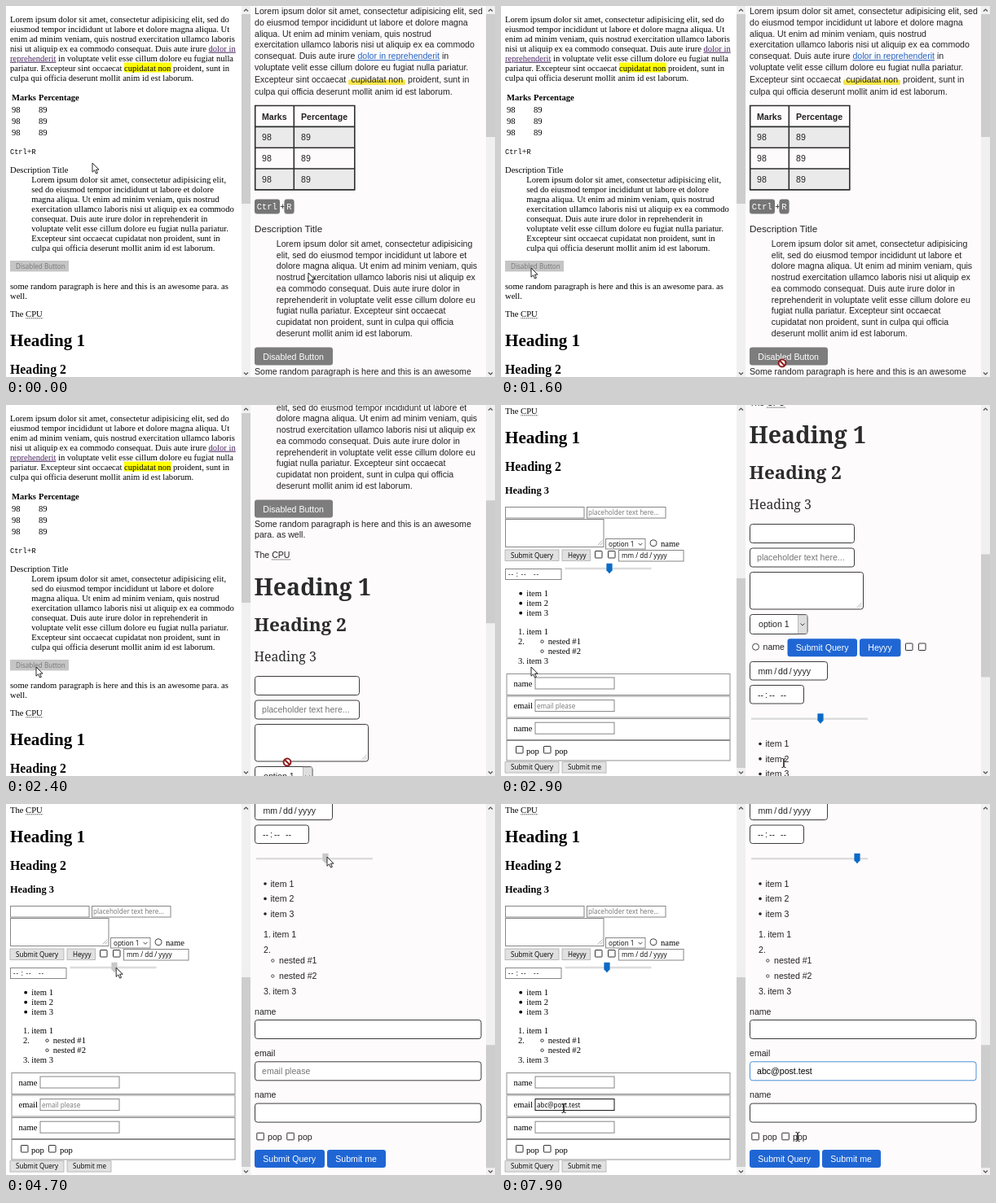
An HTML page that plays this animation: 600 px wide and 456 px high, repeating every 8000 ms.

```html
<!DOCTYPE html>
<html lang="en">
<head>
<meta charset="utf-8">
<title>Plain and styled form elements</title>
<style>
html, body { margin: 0; width: 100%; height: 100%; overflow: hidden; background: #fff; }
svg { display: block; width: 100vw; height: 100vh; }
text { white-space: pre; }
.serif { font-family: "Liberation Serif", Times, serif; font-size: 10.58px; }
.sans { font-family: "Liberation Sans", Arial, sans-serif; font-size: 10.58px; fill: #222; }
.ui { font-family: "Open Sans", "Noto Sans", sans-serif; font-size: 8.1px; }
.mono { font-family: "Liberation Mono", "Courier New", monospace; }
.head { font-family: "Noto Serif", serif; fill: #2b2b2b; }
.bold { font-weight: bold; }
.hint { fill: #757575; }
.white { fill: #fff; }
</style>
</head>
<body>
<svg id="stage" viewBox="0 0 600 456" xmlns="http://www.w3.org/2000/svg"></svg>
<script>
const LOOP = 8000;
const EMAIL = 'abc@post.test';
const LEFT_LOWER = 371, RIGHT_MIDDLE = 490, RIGHT_LOWER = 808.5;

const rect = (x, y, x2, y2, attrs = '') =>
  `<rect x="${x}" y="${y}" width="${x2 - x}" height="${y2 - y}" ${attrs}/>`;
const text = (x, y, content, cls, attrs = '') =>
  `<text x="${x}" y="${y}" class="${cls}" ${attrs}>${content}</text>`;
const lines = (x, y, step, cls, rows) =>
  rows.map((row, i) => text(x, y + step * i, row, cls)).join('');
const group = (dy, content) => `<g transform="translate(0 ${dy})">${content}</g>`;
const dot = (x, y, r, attrs = '') => `<circle cx="${x}" cy="${y}" r="${r}" ${attrs}/>`;
const path = (d, attrs) => `<path d="${d}" ${attrs}/>`;
const checkbox = (x, y) => rect(x, y, x + 8.5, y + 8.5, 'fill="#fff" stroke="#333" rx=".6"');
const radio = (x, y) => dot(x, y, 4, 'fill="#fff" stroke="#444"');
const grip = (x, y) => path(`M${x - 6} ${y}l6-6M${x - 3} ${y}l3-3`, 'stroke="#999" stroke-width=".7"');
const chevron = (x, y) => path(`M${x - 2.5} ${y - 1.2}l2.5 2.5 2.5-2.5`, 'fill="none" stroke="#444"');
const link = (s, color) => `<tspan fill="${color}" text-decoration="underline">${s}</tspan>`;
const abbr = (x, y, width) =>
  path(`M${x} ${y}h${width}`, 'stroke="#333" stroke-width=".9" stroke-dasharray="1 .7"');
const thumb = id => path('M-3.6-6.2h7.2v8.4l-3.6 4-3.6-4z', `id="${id}"`);

const plainInput = (x, y, x2, y2, attrs = '') =>
  rect(x + .5, y + .5, x2, y2, `fill="#fff" stroke="#858585" ${attrs}`);
const plainButton = (x, y, x2, label, disabled) =>
  rect(x, y, x2, y + 13.4, disabled ? 'fill="#c5c5c5"' : 'fill="#e1e1e1" stroke="#adadad" stroke-width=".8"') +
  text(x + 7, y + 9.7, label, 'ui', disabled ? 'fill="#757575"' : '');
const niceInput = (x, y, x2, y2, attrs = '') =>
  rect(x + .5, y + .5, x2 - .5, y2 - .5, `rx="3" fill="#fff" stroke="#3c3c3c" ${attrs}`);
const niceButton = (x, y, x2, label, fill = '#1f66d4') =>
  rect(x, y, x2, y + 22, `rx="3.2" fill="${fill}"`) + text(x + 10.3, y + 15, label, 'sans white');

function leftPage() {
  const visited = '#4c2a63';
  const upper =
    rect(145, 69.5, 203, 81.5, 'fill="#ff0"') +
    lines(5, 19.7, 12, 'serif', [
      'Lorem ipsum dolor sit amet, consectetur adipisicing elit, sed do',
      'eiusmod tempor incididunt ut labore et dolore magna aliqua. Ut',
      'enim ad minim veniam, quis nostrud exercitation ullamco laboris',
      'nisi ut aliquip ex ea commodo consequat. Duis aute irure ' + link('dolor in', visited),
      link('reprehenderit', visited) + ' in voluptate velit esse cillum dolore eu fugiat nulla',
      'pariatur. Excepteur sint occaecat cupidatat non proident, sunt in',
      'culpa qui officia deserunt mollit anim id est laborum.']) +
    text(7, 115.6, 'Marks', 'serif bold') + text(40, 115.6, 'Percentage', 'serif bold') +
    lines(7, 130.6, 14.4, 'serif', ['98', '98', '98']) +
    lines(40, 130.6, 14.4, 'serif', ['89', '89', '89']) +
    text(5, 182, '<tspan class="mono" font-size="8.6">Ctrl</tspan>+<tspan class="mono" font-size="8.6">R</tspan>', 'serif') +
    text(5, 204.6, 'Description Title', 'serif') +
    lines(31.2, 216.6, 12, 'serif', [
      'Lorem ipsum dolor sit amet, consectetur adipisicing elit,',
      'sed do eiusmod tempor incididunt ut labore et dolore',
      'magna aliqua. Ut enim ad minim veniam, quis nostrud',
      'exercitation ullamco laboris nisi ut aliquip ex ea commodo',
      'consequat. Duis aute irure dolor in reprehenderit in',
      'voluptate velit esse cillum dolore eu fugiat nulla pariatur.',
      'Excepteur sint occaecat cupidatat non proident, sunt in',
      'culpa qui officia deserunt mollit anim id est laborum.']) +
    plainButton(5, 313, 77, 'Disabled Button', true) +
    lines(5, 347.6, 12, 'serif', ['some random paragraph is here and this is an awesome para. as', 'well.']);

  const fieldsets = [330.5, 358, 385.5, 412.5].map((y, i) =>
    rect(7, y, 281, y + (i < 3 ? 26 : 24.5), 'fill="none" stroke="#8f8f8f"')).join('');
  const lower =
    text(5, 10.7, 'The CPU', 'serif') + abbr(24.3, 12.8, 21) +
    text(5, 46.8, 'Heading 1', 'serif bold', 'style="font-size:21.1px"') +
    text(5, 80.7, 'Heading 2', 'serif bold', 'style="font-size:15.8px"') +
    text(5, 109, 'Heading 3', 'serif bold', 'style="font-size:12.35px"') +
    plainInput(5, 125, 102, 139) + plainInput(105, 125, 202, 139) +
    text(107, 135.2, 'placeholder text here...', 'ui hint') +
    plainInput(5, 140, 126, 174.5) + grip(124.5, 172.5) +
    plainInput(128, 164, 177, 177) + text(132, 173.7, 'option 1', 'ui') + chevron(171, 171) +
    radio(187, 169.7) + text(196, 174, 'name', 'serif') +
    plainButton(5, 178, 71, 'Submit Query') + plainButton(75, 178, 109.5, 'Heyyy') +
    checkbox(115.5, 179.5) + checkbox(131.5, 179.5) +
    plainInput(144, 178, 224, 192) + text(148, 188, 'mm / dd / yyyy', 'ui') +
    plainInput(5, 201, 74, 214.5) + text(9, 210.7, '-- : --   --', 'ui', 'letter-spacing=".8"') +
    rect(78.5, 199.7, 184.5, 202.3, 'fill="#dcdcdc"') + thumb('leftThumb') +
    [231, 243, 255].map((y, i) =>
      dot(24.2, y + .7, 1.9) + text(31.2, y + 4, 'item ' + (i + 1), 'serif')).join('') +
    text(21, 281.7, '1.', 'serif') + text(31.2, 281.7, 'item 1', 'serif') +
    text(21, 293.7, '2.', 'serif') + text(21, 317.7, '3.', 'serif') +
    text(31.2, 317.7, 'item 3', 'serif') +
    [290, 302].map((y, i) => dot(50.5, y + .7, 1.7, 'fill="none" stroke="#000" stroke-width=".8"') +
      text(57.7, y + 3.7, 'nested #' + (i + 1), 'serif')).join('') +
    fieldsets +
    ['name', 'email', 'name'].map((label, i) => text(15.5, 345.8 + 27.6 * i, label, 'serif') +
      plainInput(41.5, 334.5 + 27.6 * i, 139, 349 + 27.6 * i, i === 1 ? 'id="leftField"' : '')).join('') +
    text(44, 372.8, '', 'ui', 'id="leftEmail"') +
    checkbox(18.5, 419.5) + text(31, 428.8, 'pop', 'serif') +
    checkbox(52.5, 419.5) + text(66, 428.8, 'pop', 'serif') +
    plainButton(5, 438.7, 71, 'Submit Query') + plainButton(75, 438.7, 129, 'Submit me');
  return upper + group(LEFT_LOWER, lower);
}

function niceTable() {
  const edge = i => 122.5 + 25.85 * i;
  const rows = [1, 2, 3].map(i =>
    (i % 2 ? rect(305, edge(i), 428, edge(i + 1), 'fill="#eaeaea"') : '') +
    text(314, edge(i) + 16.9, '98', 'sans') + text(362, edge(i) + 16.9, '89', 'sans')).join('');
  const rules = [0, 1, 2, 3, 4].map(i => `M305 ${edge(i)}H428.5`).join('');
  return rows + text(314, 139.8, 'Marks', 'sans bold') + text(362, 139.8, 'Percentage', 'sans bold') +
    path(rules + 'M305.7 122V226M353.3 122V226M427.8 122V226', 'stroke="#2e2e2e" stroke-width="1.6"');
}

function rightPage() {
  const key = (x, x2, label) => rect(x, 239, x2, 256, 'rx="3" fill="#bbb"') +
    rect(x, 237.5, x2, 255, 'rx="3" fill="#757575"') +
    text(x + 2.8, 249.7, label, 'mono white', 'font-size="10.4"');
  const upper =
    rect(420, 90.5, 490, 97, 'rx="1.5" fill="#f7e54a"') +
    lines(305, 10, 13.8, 'sans', [
      'Lorem ipsum dolor sit amet, consectetur adipisicing elit, sed',
      'do eiusmod tempor incididunt ut labore et dolore magna',
      'aliqua. Ut enim ad minim veniam, quis nostrud',
      'exercitation ullamco laboris nisi ut aliquip ex ea commodo',
      'consequat. Duis aute irure ' + link('dolor in reprehenderit', '#2563c4') + ' in',
      'voluptate velit esse cillum dolore eu fugiat nulla pariatur.']) +
    text(305, 94, 'Excepteur sint occaecat', 'sans') + text(423.5, 94, 'cupidatat non', 'sans') +
    text(493, 94, 'proident, sunt in', 'sans') +
    text(305, 108.8, 'culpa qui officia deserunt mollit anim id est laborum.', 'sans') +
    niceTable() +
    key(305, 336, 'Ctrl') + text(336.2, 249.6, '+', 'sans') + key(341.5, 353.5, 'R') +
    text(305, 278, 'Description Title', 'sans', 'style="font-size:11.7px"') +
    lines(331.8, 296, 13.72, 'sans', [
      'Lorem ipsum dolor sit amet, consectetur adipisicing',
      'elit, sed do eiusmod tempor incididunt ut labore et',
      'dolore magna aliqua. Ut enim ad minim veniam, quis',
      'nostrud exercitation ullamco laboris nisi ut aliquip ex',
      'ea commodo consequat. Duis aute irure dolor in',
      'reprehenderit in voluptate velit esse cillum dolore eu',
      'fugiat nulla pariatur. Excepteur sint occaecat',
      'cupidatat non proident, sunt in culpa qui officia',
      'deserunt mollit anim id est laborum.']) +
    niceButton(305, 419.5, 401, 'Disabled Button', '#7d7d7d') +
    lines(305, 452.6, 13.8, 'sans', ['Some random paragraph is here and this is an awesome', 'para. as well.']) +
    text(305, 490.8, 'The CPU', 'sans') + abbr(326, 493, 23);

  const middle =
    text(304.5, 47, 'Heading 1', 'head bold', 'font-size="28.5"') +
    text(304.5, 91, 'Heading 2', 'head bold', 'font-size="22.5"') +
    text(304.5, 128, 'Heading 3', 'head', 'font-size="15.8"') +
    niceInput(305, 146, 434, 170) + niceInput(305, 175.5, 434, 199.5) +
    text(314, 191, 'placeholder text here...', 'sans hint') +
    niceInput(305, 205, 445, 251.5) + grip(442.5, 249) +
    niceInput(305, 257, 376.5, 282) + rect(364.5, 258, 375.5, 281, 'fill="#dedede" stroke="#999" stroke-width=".6"') +
    chevron(370, 269.7) + text(316, 273, 'option 1', 'sans') +
    radio(312.5, 297.3) + text(321.5, 301.3, 'name', 'sans') +
    niceButton(351.5, 287.3, 437, 'Submit Query') + niceButton(440, 287.3, 490.5, 'Heyyy') +
    checkbox(496.5, 293) + checkbox(512.5, 293) +
    niceInput(305, 315, 401, 338.5) +
    text(315.5, 330.7, 'mm<tspan dx="2">/</tspan><tspan dx="2">dd</tspan><tspan dx="2">/</tspan><tspan dx="2">yyyy</tspan>', 'sans') +
    niceInput(305, 344, 372, 367.5) +
    text(315, 359.7, '--<tspan dx="2">:</tspan><tspan dx="2">--</tspan><tspan dx="7">--</tspan>', 'sans');

  const lower =
    rect(307, 66, 450, 68.4, 'fill="#dcdcdc"') + thumb('rightThumb') +
    [98, 116.4, 135].map((y, i) =>
      dot(318, y, 1.8, 'fill="#222"') + text(324.5, y + 3.8, 'item ' + (i + 1), 'sans')).join('') +
    [160, 179, 230].map((y, i) =>
      text(316, y + 3.8, i + 1 + '.', 'sans') + (i === 1 ? '' : text(327.3, y + 3.8, 'item ' + (i + 1), 'sans'))).join('') +
    [192, 211].map((y, i) => dot(327.3, y + .5, 1.7, 'fill="none" stroke="#222" stroke-width=".8"') +
      text(335, y + 3.8, 'nested #' + (i + 1), 'sans')).join('') +
    ['name', 'email', 'name'].map((label, i) => text(305, 258.8 + 51.3 * i, label, 'sans') +
      niceInput(305, 265 + 51.3 * i, 583.5, 289 + 51.3 * i, i === 1 ? 'id="rightField"' : '')).join('') +
    text(314, 332.2, '', 'sans', 'id="rightEmail"') +
    checkbox(307.8, 404.3) + text(321, 412.6, 'pop', 'sans') +
    checkbox(344.8, 404.3) + text(358, 412.6, 'pop', 'sans') +
    `<g id="hoverButton">${niceButton(305, 425, 391, 'Submit Query')}</g>` +
    niceButton(394, 425, 466, 'Submit me');
  return upper + group(RIGHT_MIDDLE, middle) + group(RIGHT_LOWER, lower);
}

const scrollbar = (x, id, height) =>
  rect(x, 0, x + 11, 456, 'fill="#f0f0f0"') +
  rect(x, 0, x + 11, height, `id="${id}" fill="#cdcdcd"`) +
  path(`M${x + 3} 6.5l2.5-2.5 2.5 2.5M${x + 3} 450.5l2.5 2.5 2.5-2.5`, 'fill="none" stroke="#505050" stroke-width="1.2"');

const POINTERS = {
  arrow: path('M0 0V11.2l2.6-2.4 1.9 4.2 1.9-.8-1.9-4.1h3.5z', 'fill="#fff" stroke="#111" stroke-width=".9"'),
  blocked: dot(0, 0, 4.4, 'fill="#fff" stroke="#8e1b1b" stroke-width="2"') +
    path('M-3-3l6 6', 'stroke="#8e1b1b" stroke-width="2"'),
  beam: path('M-2.5-5.5q2.5 0 2.5 1.3v8.4q0 1.3-2.5 1.3M2.5-5.5q-2.5 0-2.5 1.3v8.4q0 1.3 2.5 1.3', 'fill="none" stroke="#111"'),
  hand: path('M-1 0q1-1.2 2 0v4.3l5 1.2q1 .4.8 1.6l-.9 5.4h-6l-3.4-4.6q.4-1.4 1.5-.6l1 .9z', 'fill="#fff" stroke="#111" stroke-width=".9"')
};
const pointer = id => `<g id="${id}">` + Object.entries(POINTERS).map(([kind, art]) =>
  `<g data-kind="${kind}">${art}</g>`).join('') + '</g>';

document.getElementById('stage').innerHTML =
  `<clipPath id="leftClip">${rect(0, 0, 289, 456)}</clipPath>` +
  `<clipPath id="rightClip">${rect(300, 0, 589, 456)}</clipPath>` +
  rect(0, 0, 300, 456, 'fill="#fff"') + rect(300, 0, 600, 456, 'fill="#fdfbfc"') +
  `<g clip-path="url(#leftClip)"><g id="leftPage">${leftPage()}</g></g>` +
  `<g clip-path="url(#rightClip)"><g id="rightPage">${rightPage()}</g></g>` +
  scrollbar(289, 'leftBar', 233) + scrollbar(589, 'rightBar', 151) +
  pointer('leftPointer') + pointer('rightPointer');

const el = Object.fromEntries([...document.querySelectorAll('[id]')].map(node => [node.id, node]));

const smooth = k => k * k * (3 - 2 * k);
const linear = k => k;

// Keys are [time, value, value...]; values hold outside the listed range.
function tween(keys, t, ease = smooth) {
  const next = keys.findIndex(key => key[0] > t);
  if (next === 0) return keys[0].slice(1);
  if (next < 0) return keys[keys.length - 1].slice(1);
  const a = keys[next - 1], b = keys[next];
  const k = ease((t - a[0]) / (b[0] - a[0]));
  return a.slice(1).map((v, i) => v + (b[i + 1] - v) * k);
}
const step = (keys, t) => keys.filter(key => key[0] <= t).pop()[1];

const LEFT_MOVE = [[200, 106, 193], [1100, 37, 322], [3000, 37, 322], [3600, 145, 183], [3900, 145, 183],
  [4600, 134, 201], [5100, 145, 202], [5800, 124, 203], [6200, 131, 202], [6600, 77, 374]];
const RIGHT_MOVE = [[200, 371, 328], [1100, 345, 439], [2500, 345, 439], [2900, 347, 440], [3600, 344.5, 435],
  [3900, 344.5, 435], [4600, 392, 65], [5400, 437, 66], [5800, 501, 64.5], [6050, 501, 64.5],
  [6600, 380, 328], [7300, 380, 328], [7700, 364, 409]];
const LEFT_KIND = [[0, 'arrow'], [6550, 'beam']];
const RIGHT_KIND = [[0, 'arrow'], [1000, 'blocked'], [2500, 'beam'], [3600, 'hand'], [4000, 'arrow'], [6500, 'beam']];
const LEFT_SLIDE = [[4700, 133], [5100, 144], [5800, 121], [6200, 130]];
const RIGHT_SLIDE = [[4700, 392], [5400, 437]];
const LEFT_SCROLL = [[2500, 0], [2850, LEFT_LOWER]];
const RIGHT_SCROLL = [[1700, 0], [2350, 303], [2450, 303], [2850, 490], [2950, 490], [3600, RIGHT_LOWER]];

const place = (node, x, y) => node.setAttribute('transform', `translate(${x} ${y})`);

function movePointer(node, [x, y], kind) {
  place(node, x, y);
  for (const art of node.children) art.style.display = art.dataset.kind === kind ? '' : 'none';
}

function fillEmail(field, label, t, focusColor, idleColor) {
  const typed = EMAIL.slice(0, Math.max(0, Math.floor((t - 6750) / 60)));
  label.textContent = typed || 'email please';
  label.style.fill = typed ? '#000' : '#757575';
  field.setAttribute('stroke', t >= 6650 ? focusColor : idleColor);
}

function render(t) {
  const [leftY] = tween(LEFT_SCROLL, t), [rightY] = tween(RIGHT_SCROLL, t, linear);
  place(el.leftPage, 0, -leftY);
  place(el.rightPage, 0, -rightY);
  el.leftBar.setAttribute('y', 10 + leftY * .547);
  el.rightBar.setAttribute('y', 10 + rightY * .354);

  place(el.leftThumb, tween(LEFT_SLIDE, t)[0], 201);
  place(el.rightThumb, tween(RIGHT_SLIDE, t)[0], 67);
  const thumbColor = t >= 4700 && t < 6200 ? '#c8c8c8' : '#0b6bc7';
  el.leftThumb.setAttribute('fill', thumbColor);
  el.rightThumb.setAttribute('fill', thumbColor);

  const hover = t >= 3600 && t < 4000;
  place(el.hoverButton, 0, hover ? -2 : 0);
  el.hoverButton.style.filter = hover ? 'drop-shadow(0 2px 2px rgba(0,0,0,.4))' : '';

  fillEmail(el.leftField, el.leftEmail, t, '#111', '#858585');
  fillEmail(el.rightField, el.rightEmail, t, '#4a90d2', '#3c3c3c');
  movePointer(el.leftPointer, tween(LEFT_MOVE, t), step(LEFT_KIND, t));
  movePointer(el.rightPointer, tween(RIGHT_MOVE, t), step(RIGHT_KIND, t));
}

const start = performance.now();
function frame() {
  render((performance.now() - start) % LOOP);
  requestAnimationFrame(frame);
}
render(0);
requestAnimationFrame(frame);
</script>
</body>
</html>
```
